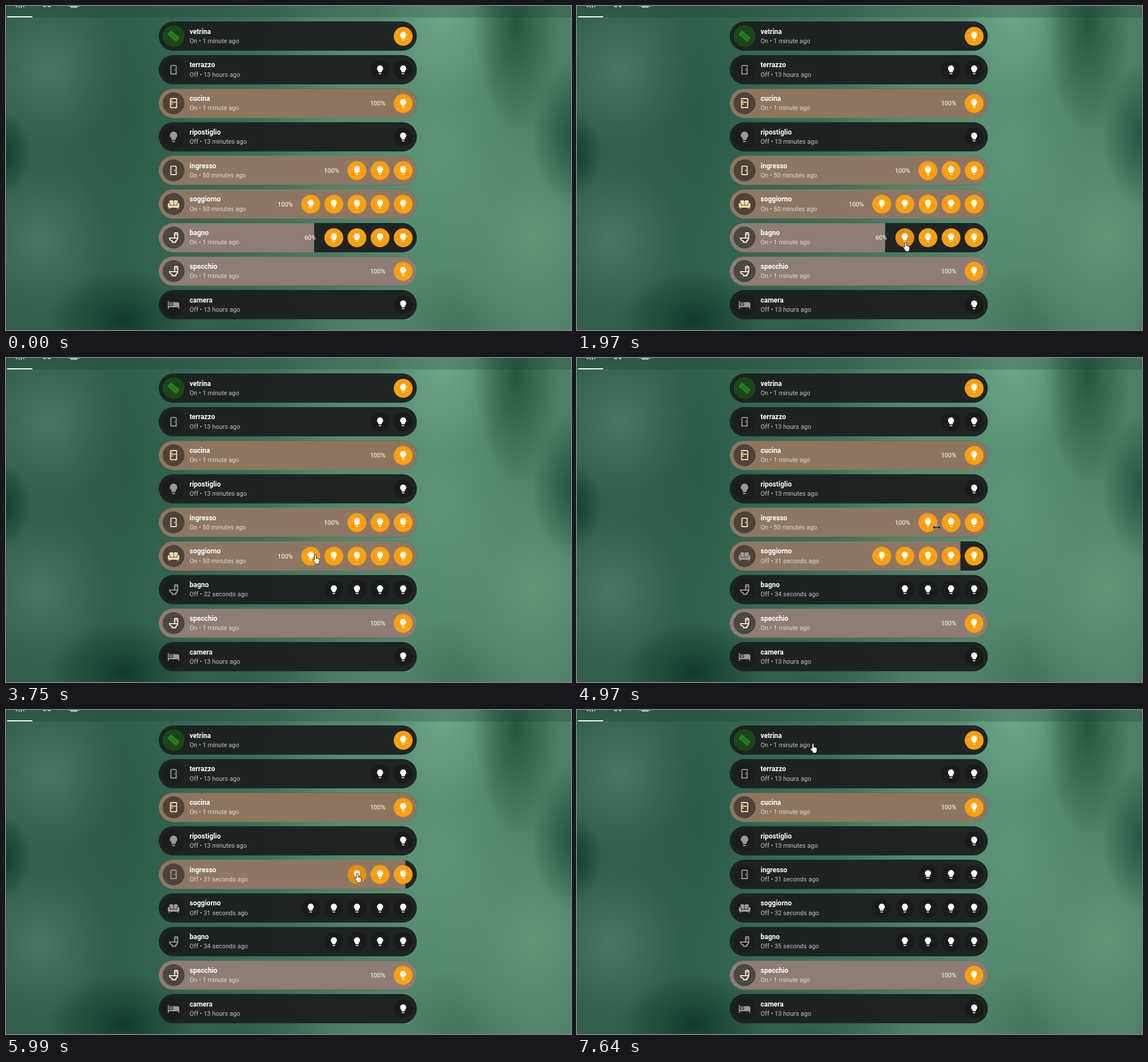
An HTML page for the animation above (8000 ms loop, 988x567 px).

```html
<!DOCTYPE html>
<html lang="it">
<head>
<meta charset="utf-8">
<title>Luci</title>
<style>
  html, body { margin: 0; width: 100%; height: 100%; overflow: hidden; }
  #stage { position: absolute; left: 0; top: 0; width: 988px; height: 567px; overflow: hidden; }
  svg { position: absolute; left: 0; top: 0; font-family: Roboto, sans-serif; }
  .name { font-size: 12px; font-weight: 700; fill: #fff; }
  .state { font-size: 11px; fill: #fff; fill-opacity: .72; }
  .level { font-size: 11px; fill: #fff; text-anchor: end; }
</style>
</head>
<body>
<div id="stage"><svg id="view" width="988" height="567" viewBox="0 0 988 567"></svg></div>
<script>
const LOOP = 8000, LEFT = 267, WIDTH = 451.5, TOP = 27, PITCH = 58.75, HEIGHT = 51.5, MID = HEIGHT / 2;
const LAST_X = 694.5, STEP_X = 40.4;

const ICONS = {
  bulb: 'M12 2A7 7 0 0 0 5 9C5 11.38 6.19 13.47 8 14.74V17A1 1 0 0 0 9 18H15A1 1 0 0 0 16 17V14.74C17.81 13.47 19 11.38 19 9A7 7 0 0 0 12 2M9 21A1 1 0 0 0 10 22H14A1 1 0 0 0 15 21V20H9Z',
  door: 'M8 3C6.9 3 6 3.9 6 5V21H18V5C18 3.9 17.1 3 16 3ZM8 5H16V19H8ZM13 11V13H15V11Z',
  fridge: 'M9 21V22H7V21A2 2 0 0 1 5 19V4A2 2 0 0 1 7 2H17A2 2 0 0 1 19 4V19A2 2 0 0 1 17 21V22H15V21ZM7 4V9H17V4ZM7 19H17V11H7ZM8 12H10V15H8ZM8 6H10V8H8Z',
  sofa: 'M12.5 7C12.5 5.9 13.4 5 14.5 5H18C19.1 5 20 5.9 20 7V9.2C18.8 9.6 18 10.7 18 12V14H12.5ZM6 12V14H11.5V7C11.5 5.9 10.6 5 9.5 5H6C4.9 5 4 5.9 4 7V9.2C5.2 9.6 6 10.7 6 12M20.7 10C19.7 10.2 19 11.1 19 12.1V15H5V12A2 2 0 0 0 1 12V17C1 18.1 1.9 19 3 19V21H5V19H19V21H21V19C22.1 19 23 18.1 23 17V12C23 10.8 21.9 9.8 20.7 10Z',
  toilet: 'M9 22H17V19.5C19.4 17.9 21 15.1 21 12V4C21 2.9 20.1 2 19 2H15C13.9 2 13 2.9 13 4V12H3C3 15.1 5 18 9 19.5ZM5.3 14H18.7C18 16 16 17.5 15 18V20H11V18C8 17 6 16 5.3 14M15 4H19V12H15ZM16 5V8H18V5Z',
  bed: 'M19 7H11V14H3V5H1V20H3V17H21V20H23V11A4 4 0 0 0 19 7M7 13A3 3 0 0 0 7 7A3 3 0 0 0 7 13M7 11.2A1.2 1.2 0 0 1 7 8.8A1.2 1.2 0 0 1 7 11.2Z'
};

const WARM = '#ffdcae', PALE = '#fff0dc', GREY = '#989898';

// off: switch-off time, hover: [in, out], ticks: times at which the seconds advance
const ROWS = [
  { name: 'vetrina', icon: 'strip', state: 'On • 1 minute ago', lights: 1, lit: true },
  { name: 'terrazzo', icon: 'door', state: 'Off • 13 hours ago', lights: 2 },
  { name: 'cucina', icon: 'fridge', state: 'On • 1 minute ago', lights: 1, lit: true, fill: '#8d765f', level: 100, tint: WARM },
  { name: 'ripostiglio', icon: 'bulb', state: 'Off • 13 minutes ago', lights: 1 },
  { name: 'ingresso', icon: 'door', state: 'On • 50 minutes ago', lights: 3, lit: true, fill: '#8d7764', level: 100, tint: WARM,
    off: 5940, hover: [5380, 6000], ticks: [] },
  { name: 'soggiorno', icon: 'sofa', state: 'On • 50 minutes ago', lights: 5, lit: true, fill: '#8d7764', level: 100, tint: WARM,
    off: 4890, hover: [4420, 4700], ticks: [6000] },
  { name: 'bagno', icon: 'toilet', state: 'On • 1 minute ago', lights: 4, lit: true, fill: '#8d7d74', level: 60, tint: PALE,
    off: 2290, hover: [1700, 2400], ticks: [3300, 4430, 4900, 6000] },
  { name: 'specchio', icon: 'toilet', state: 'On • 1 minute ago', lights: 1, lit: true, fill: '#8d7d74', level: 100, tint: PALE },
  { name: 'camera', icon: 'bed', state: 'Off • 13 hours ago', lights: 1 }
];

// pointer tip: time, x, y
const PATH = [
  [0, 905, 590], [65, 905, 590], [70, 901, 551], [340, 815.5, 438.5], [800, 815.5, 438.5],
  [1500, 574.5, 413], [3260, 574.5, 413], [3750, 541, 344], [4080, 541, 344], [4150, 537.5, 342.5],
  [4560, 537.5, 342.5], [4970, 629, 296.5], [5180, 618, 297], [5250, 618, 297], [5450, 614.5, 294],
  [5930, 614.5, 294], [6340, 577, 118.5], [6680, 433, 89], [6750, 433, 89], [6890, 420.5, 100.5],
  [7500, 420.5, 100.5], [7640, 412.5, 58.5], [8000, 412.5, 58.5]
];

// soft spots of the blurred wallpaper: x, y, rx, ry, colour (front to back)
const SPOTS = [
  [-8, 258, 52, 75, '#0c3b2c'], [205, 550, 130, 90, '#123c2d'], [994, 225, 75, 130, '#1f523f'],
  [893, 30, 75, 190, '#25573f'], [765, 25, 120, 150, '#6ca588'], [215, 190, 110, 210, '#28584599'],
  [75, 110, 130, 130, '#487660'], [60, 410, 120, 130, '#487661'], [925, 400, 170, 200, '#629478'],
  [760, 250, 130, 230, '#5e9579'], [620, 160, 170, 300, '#5a8f74'], [790, 560, 150, 110, '#44765c'],
  [400, 567, 170, 100, '#2c5d48']
];
document.getElementById('stage').style.background =
  SPOTS.map(([x, y, rx, ry, c]) => `radial-gradient(${rx}px ${ry}px at ${x}px ${y}px, ${c}, ${c.slice(0, 7)}00)`)
    .concat('linear-gradient(90deg, #315f4b, #2f604b 22%, #3d715a 45%, #548a6e 72%, #4b8065)').join();

const svg = document.getElementById('view');
const clamp = v => Math.min(1, Math.max(0, v));
const span = (t, from, to) => clamp((t - from) / (to - from));
const smooth = u => u * u * (3 - 2 * u);

function add(parent, tag, attrs = {}, text) {
  const el = document.createElementNS('http://www.w3.org/2000/svg', tag);
  for (const k in attrs) el.setAttribute(k, attrs[k]);
  if (text) el.textContent = text;
  return parent.appendChild(el);
}

function addIcon(parent, name, x, size, fill) {
  const s = size / 24;
  return add(parent, 'path', {
    d: ICONS[name], fill, 'fill-rule': 'evenodd',
    transform: `translate(${x - size / 2} ${MID - size / 2}) scale(${s})`
  });
}

function addStrip(parent) {
  const g = add(parent, 'g', { transform: `translate(293 ${MID}) rotate(41)` });
  add(g, 'rect', { x: -10, y: -4.5, width: 20, height: 9, rx: 1, fill: '#278a20' });
  for (let x = -7; x < 9; x += 3.5) add(g, 'rect', { x, y: -2.6, width: 1.1, height: 5.2, fill: '#1c4a18' });
}

const lightX = (row, i) => LAST_X - (row.lights - 1 - i) * STEP_X;

function buildHeader() {
  add(svg, 'rect', { width: 988, height: 20, fill: '#1c3a30', 'fill-opacity': .26 });
  add(svg, 'rect', { x: 2, y: 18, width: 44, height: 2, fill: '#fff' });
  const bits = 'M17 0h3v2h-3zM22 0h2v3h-2zM26 0h2v3h-2zM30 0h2v2h-2zM65 0h5v2h-5zM73 0h5v2h-5zM109 0h20v1h-4v2h-12v-2h-4z';
  add(svg, 'path', { d: bits, fill: '#fff', 'fill-opacity': .6 });
}

function buildRow(row, i) {
  const g = add(svg, 'g', { transform: `translate(0 ${TOP + i * PITCH})` });
  const card = add(g, 'g', { 'clip-path': 'url(#pill)' });
  add(card, 'rect', { x: LEFT, width: WIDTH, height: HEIGHT, fill: '#1d2120', 'fill-opacity': .96 });
  if (row.fill) row.bar = add(card, 'rect', { x: LEFT, width: WIDTH * row.level / 100 + (row.level < 100), height: HEIGHT, fill: row.fill });

  const strip = row.icon === 'strip';
  add(g, 'circle', { cx: 293, cy: MID, r: 19.2, fill: strip ? '#1c4618' : '#1a1a1a', 'fill-opacity': strip ? 1 : .55 });
  if (strip) addStrip(g);
  else row.mark = addIcon(g, row.icon, 293, 22, row.tint || GREY);

  add(g, 'text', { class: 'name', x: 321, y: MID - 4.2 }, row.name);
  row.label = add(g, 'text', { class: 'state', x: 321, y: MID + 12 }, row.state);
  if (row.level) row.percent = add(g, 'text', { class: 'level', x: lightX(row, 0) - 31.2, y: MID + 4 }, row.level + '%');

  row.glows = [];
  for (let n = 0; n < row.lights; n++) {
    const spot = { cx: lightX(row, n), cy: MID + .3, r: 16.5 };
    if (!row.lit || row.off) add(g, 'circle', { ...spot, fill: '#1b1b1b', 'fill-opacity': row.lit ? 0 : 1 });
    if (row.lit) {
      const base = row.off && g.lastChild;
      row.glows.push({ base, lamp: add(g, 'circle', { ...spot, fill: '#ff9f0d' }) });
      if (n === 0 && row.hover) row.shade = add(g, 'circle', { ...spot, fill: '#000', 'fill-opacity': 0 });
    }
    addIcon(g, 'bulb', spot.cx, 18.4, '#fff');
  }
}

function buildPointers() {
  const line = { fill: '#fff', stroke: '#111', 'stroke-width': .9, 'stroke-linejoin': 'round' };
  return {
    arrow: add(svg, 'path', { ...line, d: 'M0 0V12.5L2.9 9.8L4.8 14L6.7 13.2L4.9 9.2H8.8Z' }),
    hand: add(svg, 'path', { ...line, d: 'M-1.5 1.5a1.5 1.5 0 0 1 3 0V6.4l4 .9q2 .5 1.8 2.6l-.5 4-.9 2.8H0L-1 14l-2.9-3.8q-.9-1.3.1-1.9 1-.5 2.3.9Z' }),
    resize: add(svg, 'path', { ...line, fill: '#16222e', stroke: '#cfd6d6', 'stroke-width': .6, d: 'M-7.5 0L-3 -4V-1.2H3V-4L7.5 0L3 4V1.2H-3V4Z' })
  };
}

// Cubic through the points, at rest wherever the pointer pauses
function pointerAt(t) {
  let i = 0;
  while (i < PATH.length - 2 && PATH[i + 1][0] <= t) i++;
  const a = PATH[i], b = PATH[i + 1], d = b[0] - a[0], u = clamp((t - a[0]) / d);
  const slope = (k, c) => {
    const p = PATH[k - 1], q = PATH[k], r = PATH[k + 1];
    if (!p || !r || k < 3 || (q[1] === p[1] && q[2] === p[2]) || (q[1] === r[1] && q[2] === r[2])) return 0;
    return (r[c] - p[c]) / (r[0] - p[0]);
  };
  return [1, 2].map(c => {
    const e = smooth(u);
    return a[c] + (b[c] - a[c]) * e + d * u * (1 - u) * ((1 - u) * slope(i, c) - u * slope(i + 1, c));
  });
}

function pointerKind(x, y) {
  const i = Math.floor((y - TOP) / PITCH), row = ROWS[i], dy = y - TOP - i * PITCH;
  if (!row || x > LEFT + WIDTH || dy > HEIGHT) return 'arrow';
  if (!row.fill) return 'hand';
  for (let n = 0; n < row.lights; n++)
    if (Math.hypot(x - lightX(row, n), dy - MID) < 16.7) return 'hand';
  return 'resize';
}

function drawRow(row, t) {
  if (!row.off) return;
  const age = t - row.off, off = age >= 0;
  const left = off ? 1 - smooth(span(age, 0, 400)) : 1;
  row.bar.setAttribute('width', (WIDTH * row.level / 100 + (row.level < 100)) * left);
  row.mark.setAttribute('fill', off ? '#a09c96' : row.tint);
  row.percent.setAttribute('visibility', off ? 'hidden' : 'visible');

  const secs = 31 + row.ticks.filter(at => t >= at).length;
  const text = off ? `Off • ${secs} seconds ago` : row.state;
  if (row.label.textContent !== text) row.label.textContent = text;

  const glow = (1 - span(age, 90, 520)) ** 2;
  for (const { base, lamp } of row.glows) {
    base.setAttribute('fill-opacity', 1 - glow);
    lamp.setAttribute('fill-opacity', glow);
  }
  const [from, to] = row.hover;
  row.shade.setAttribute('fill-opacity', .1 * span(t, from, from + 140) * (1 - span(t, to, to + 140)));
}

const clip = add(add(svg, 'defs'), 'clipPath', { id: 'pill' });
add(clip, 'rect', { x: LEFT, width: WIDTH, height: HEIGHT, rx: MID });
buildHeader();
ROWS.forEach(buildRow);
const pointers = buildPointers();

function draw(t) {
  ROWS.forEach(row => drawRow(row, t));
  const [x, y] = pointerAt(t), kind = pointerKind(x, y);
  for (const k in pointers) {
    pointers[k].setAttribute('visibility', k === kind && t >= 70 ? 'visible' : 'hidden');
    pointers[k].setAttribute('transform', `translate(${x} ${y})`);
  }
}

const start = performance.now();
function tick() {
  draw((performance.now() - start) % LOOP);
  requestAnimationFrame(tick);
}
draw(0);
requestAnimationFrame(tick);
</script>
</body>
</html>
```
